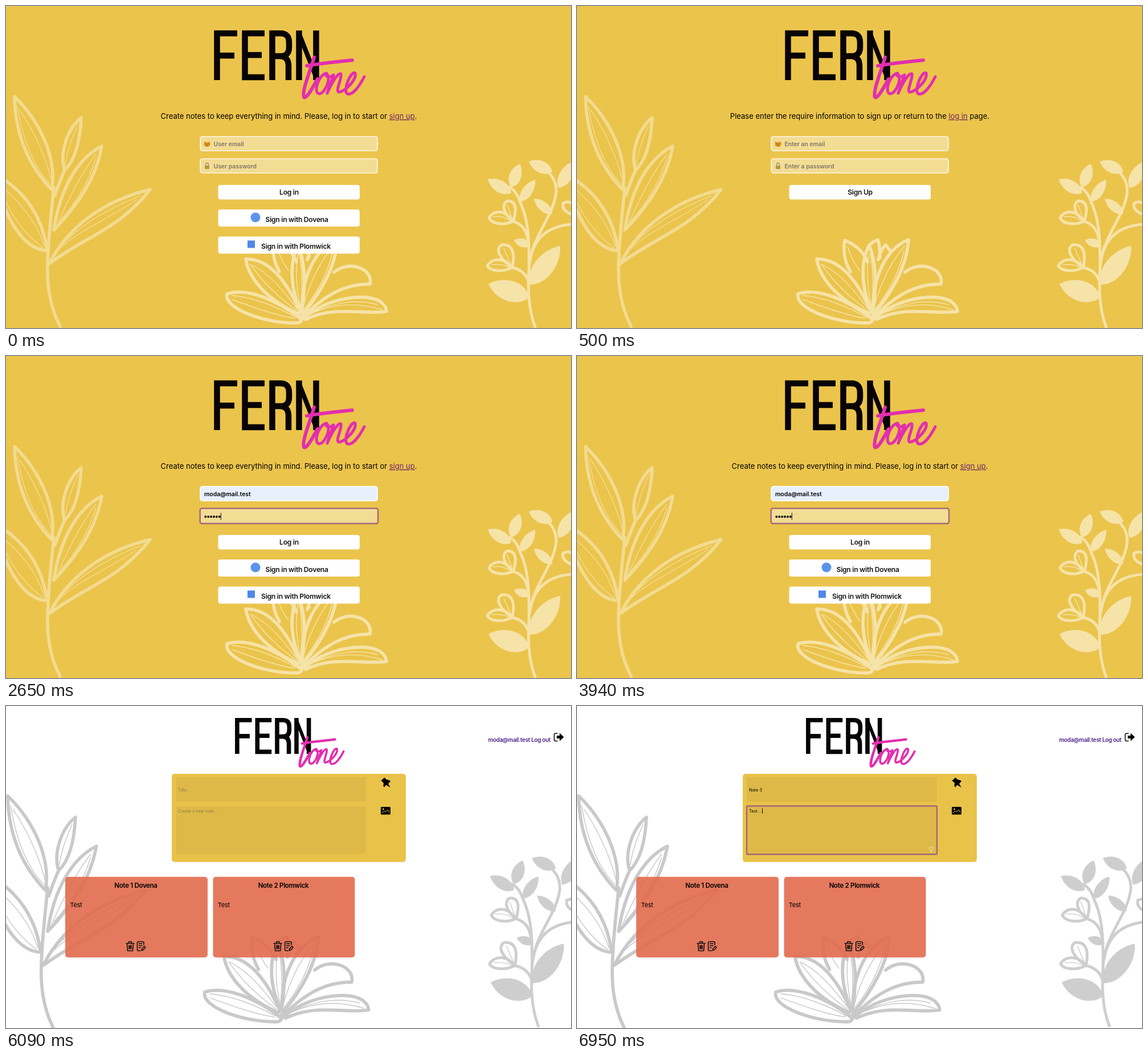
An HTML page that plays this animation: 992 by 565 pixels, repeating every 8 s.

```html
<!DOCTYPE html>
<html lang="en">
<head>
<meta charset="utf-8">
<title>Notes app</title>
<style>
html, body { margin: 0; width: 100%; height: 100%; overflow: hidden; background: #ebc44c; }
svg { display: block; width: 100%; height: 100%; }
text { font-family: Inter, "Open Sans", sans-serif; }
[data-on] { display: none; }
.line { fill: none; stroke: currentColor; stroke-width: 5.6; stroke-linecap: round; stroke-linejoin: round; }
.thin { stroke-width: 4.8; }
.vein { fill: none; stroke: currentColor; stroke-width: 1.4; stroke-linecap: round; }
.intro { font-size: 13px; text-anchor: middle; }
.link { fill: #6a2468; text-decoration: underline; }
.field { fill: #f3dc94; stroke: #fef8e6; stroke-width: 1.6; }
.hint { font-size: 10.4px; font-weight: 600; fill: #7d7768; }
.typed { font-size: 10.4px; font-weight: 600; }
.button { fill: #fff; }
.label { font-size: 12.2px; font-weight: 600; letter-spacing: -.3px; fill: #161616; }
.mid { text-anchor: middle; }
.small { font-size: 7.3px; }
.focus { stroke: #a4677a; stroke-width: 2.4; }
.card { fill: rgba(227, 107, 77, .9); }
.title { font-size: 11.5px; font-weight: 600; letter-spacing: -.3px; text-anchor: middle; }
.body { font-size: 11px; letter-spacing: -.2px; }
.icon { fill: none; stroke: #111; stroke-width: 1.6; stroke-linecap: round; stroke-linejoin: round; }
</style>
</head>
<body>
<svg viewBox="0 0 992 565" preserveAspectRatio="none">
<defs>
  <g id="logo">
    <g fill="none" stroke="#080404" stroke-width="10.5">
      <path d="M370.5 130V48H406M370.5 87H401"/>
      <path d="M454 48H419.5V125H454M419.5 86H449"/>
      <path d="M467.5 130V48H482Q497 48 497 64V72Q497 88 482 88H467.5M482 88Q496 89 496 105V130"/>
      <path d="M514.500 130V43M544.500 130V43"/>
      <path d="M514 47L545 126" stroke-width="8"/>
    </g>
    <g fill="none" stroke="#e32eae" stroke-width="6" stroke-linecap="round" stroke-linejoin="round">
      <path d="M541 90C534 114 519 150 523 160C528 164 540 140 547 128"/>
      <path d="M528 105C555 100 582 98 608 95"/>
      <path d="M563 118C548 120 539 153 550 154C562 153 573 120 561 119Q564 129 575 121L564 153C570 139 582 116 588 119C591 125 578 148 584 151C594 151 616 130 613 118C606 112 591 148 599 154C609 158 622 138 629 124" stroke-width="5"/>
    </g>
  </g>
  <g id="left">
    <g class="line">
      <path d="M95 562C78 530 72 492 73 455C74 405 80 362 84 318"/>
      <path d="M15 159C16 215 32 272 80 322C90 270 62 205 15 159Z"/>
      <path d="M132 196C108 215 93 258 103 288C122 270 130 235 132 196ZM103 288Q95 305 86 332"/>
      <path d="M168 246C126 267 95 320 84 393C112 364 158 310 168 246Z"/>
      <path d="M253 322C195 336 118 370 76 452C140 404 198 392 253 322Z"/>
      <path d="M-4 304C34 330 64 370 72 429C40 428 14 395 -4 350"/>
    </g>
    <path class="vein" d="M20 176C28 225 45 278 77 312M24 182C48 218 69 262 79 303M126 209Q109 246 104 278M158 260C130 296 107 345 91 380M158 266C144 312 118 352 95 376M236 333C181 354 119 389 83 437M229 340C182 373 119 397 86 434M0 324C35 354 56 386 67 421M0 344C16 379 43 409 65 424"/>
  </g>
  <g id="lotus">
    <g class="line">
      <path d="M519 550C476 515 422 494 388 505C382 532 458 558 513 556Q521 554 519 544"/>
      <path d="M514 540C464 519 427 482 421 444C461 443 492 480 517 538"/>
      <path d="M480 466C470 449 467 430 470 411C491 420 504 433 510 449"/>
      <path d="M516 532C497 488 499 445 513 420C526 452 526 493 519 535"/>
      <path d="M512 421Q519 414 528 410Q532 420 532 441M529 445Q533 427 542 419L550 430"/>
      <path d="M520 536C518 472 545 425 582 410C579 457 553 503 521 540"/>
      <path d="M576 467C604 444 645 462 639 488C594 487 558 509 522 545"/>
      <path d="M522 548C566 511 630 503 656 518Q668 526 668 536C626 542 576 525 526 550"/>
    </g>
    <path class="vein" d="M397 508C433 511 475 527 508 546M397 515C432 528 473 543 507 548M429 453C451 485 481 513 510 534M432 454C467 472 491 506 511 531M475 422Q483 447 496 464M513 435C507 464 511 503 517 526M515 435C521 465 520 500 518 526M575 421C548 453 530 494 522 528M574 429C566 466 547 502 524 531M660 533C619 520 574 521 529 543M652 524C609 512 569 523 530 542"/>
  </g>
  <g id="right">
    <g class="line thin">
      <path d="M929 563C918 535 916 499 918 466C919 406 960 375 966 327C967 306 956 292 942 285"/>
      <path d="M920 448C926 407 951 386 994 383M918 490C918 440 922 384 903 345C900 336 896 325 884 318"/>
      <path d="M848 372C854 359 876 355 889 378C875 385 854 383 848 372ZM891 377C874 366 869 348 880 342C899 342 895 362 891 377ZM890 378Q911 383 916 408"/>
      <path d="M845 456C853 442 875 440 888 459C874 467 851 466 845 456ZM889 458C868 446 857 425 871 419C892 417 893 438 889 458ZM888 459Q909 462 917 482"/>
      <path d="M994 366Q975 359 978 346Q988 341 994 347"/>
    </g>
    <path class="vein" d="M855 370Q873 367 885 377M880 349L889 374M853 454Q872 452 884 459M874 425L887 455"/>
    <path id="leaves" fill="currentColor"/>
  </g>
  <g id="hints">
    <path d="M348 237.500L351 239Q353 238.500 355 239L358 237.500L358.500 242Q359 247 353 247T347.500 242Z" fill="#e39a1c"/>
    <path d="M349.500 242H352M354 242H356.500M351.500 244.500H354.500" stroke="#6d3e12" stroke-width="1.200"/>
    <path d="M350.5 281V278Q350.5 275.5 353 275.5T355.5 278V281" fill="none" stroke="#969178" stroke-width="1.3"/>
    <rect x="349" y="280" width="8" height="6" rx="1" fill="#b39743"/>
  </g>
  <g id="tools" class="icon">
    <path d="M211 416.5H225M215.5 416V413.5H220.5V416M212.5 417L213.5 429.5H222.5L223.5 417M216 420V426M218 420V426M220 420V426"/>
    <path d="M236 429.5H232.5Q230.5 429.5 230.5 427.5V415.5Q230.5 413.5 232.5 413.5H240Q242 413.5 242 415.5V419M233.5 417H239M233.5 420.5H239M233.5 424H236M238 429L239 425.5L243 421.5L245 423.5L241 428Z"/>
  </g>
</defs>

<g data-on="0 1 2">
  <rect width="992" height="565" fill="#ebc44c"/>
  <use href="#left" color="#f3db90"/>
  <g color="#f6e3a8"><use href="#lotus"/><use href="#right"/></g>
  <use href="#logo"/>
  <text class="intro" x="496.5" y="198" data-on="0 2">Create notes to keep everything in mind. Please, log in to start or <tspan class="link">sign up</tspan>.</text>
  <text class="intro" x="496.5" y="198" data-on="1">Please enter the require information to sign up or return to the <tspan class="link">log in</tspan> page.</text>
  <g class="field">
    <rect x="341.2" y="229" width="311" height="25" rx="4"/>
    <rect x="341.2" y="268" width="311" height="25" rx="4"/>
  </g>
  <use href="#hints" data-on="0 1"/>
  <g class="hint" data-on="0"><text x="364.5" y="245.5">User email</text><text x="364.5" y="284.7">User password</text></g>
  <g class="hint" data-on="1"><text x="364.5" y="245.5">Enter an email</text><text x="364.5" y="284.7">Enter a password</text></g>
  <g data-on="2">
    <rect x="341.2" y="229" width="311" height="25" rx="4" fill="#e8f0fe" stroke="#fff" stroke-width="1.4"/>
    <text class="typed" x="348" y="245.5">moda@mail.test</text>
    <rect class="focus" x="340.7" y="267.4" width="312.4" height="26.6" rx="3" fill="#f3dc94"/>
    <path d="M350.3 282H375" stroke="#111" stroke-width="4" stroke-linecap="round" stroke-dasharray="0 4.9"/>
    <path d="M377.3 275V287.5" stroke="#111"/>
  </g>
  <rect class="button" x="372.5" y="314" width="248.5" height="25.5" rx="4"/>
  <text class="label mid" x="497" y="331" data-on="0 2">Log in</text>
  <text class="label mid" x="497" y="331" data-on="1">Sign Up</text>
  <g data-on="0 2">
    <rect class="button" x="372.5" y="357" width="248.5" height="30" rx="4"/>
    <circle cx="438" cy="371" r="8.5" fill="#5a94ea"/>
    <text class="label" x="455.5" y="378.5">Sign in with Dovena</text>
    <rect class="button" x="372.5" y="404.5" width="248.5" height="30" rx="4"/>
    <rect x="424" y="411.5" width="13" height="13" fill="#4f87e6"/>
    <text class="label" x="448" y="426">Sign in with Plomwick</text>
  </g>
</g>

<g data-on="3 4">
  <rect width="992" height="565" fill="#fff"/>
  <g color="#c9c9c9">
    <use href="#left" transform="translate(-12.3 -4.2) scale(1.017)"/>
    <use href="#lotus" transform="translate(-50 -13.2) scale(1.028 1.02)"/>
    <use href="#right" color="#cecece" transform="translate(-13 -10.2) scale(1.02 1.015)"/>
  </g>
  <use href="#logo" transform="translate(138 -10) scale(.723)"/>
  <text x="956" y="62.5" text-anchor="end" font-size="9.8" font-weight="600" letter-spacing="-.25" fill="#4b1f8a">moda@mail.test Log out</text>
  <path class="icon" d="M968 48H965Q962.5 48 962.5 50.5V59Q962.5 61.5 965 61.5H968"/>
  <path d="M967 52H972V47.5L979.5 54.5L972 61.5V57H967Z"/>
  <rect x="291" y="119" width="411" height="154.7" rx="5" fill="#e9c349"/>
  <rect x="298" y="125" width="334" height="43" fill="#dfb947"/>
  <rect x="298" y="176" width="334" height="84" fill="#dfb947"/>
  <path d="M658.5 131L664.5 125.5L668 129L673.5 130.5L675 132L671 136.5L675 143L667.5 138.5L664 142.5L662.5 140.5L663 135Z"/>
  <rect x="658" y="177" width="17" height="13.5" rx="1.5"/>
  <path d="M660 188L664 184L666.5 186L670 182L673.5 187" fill="none" stroke="#e9c349"/>
  <circle cx="662.5" cy="181" r="1.4" fill="#e9c349"/>
  <g class="small" fill="#8c7c4b" data-on="3"><text x="302" y="149.8">Title...</text><text x="302" y="186.8">Create a new note...</text></g>
  <g class="small" data-on="4">
    <rect class="focus" x="298" y="175.5" width="334" height="84.7" rx="1" fill="none"/>
    <text x="302" y="149.8">Note 3</text><text x="302" y="186.8">Test ...</text>
    <path d="M325.5 179.5V188.5" stroke="#111"/>
    <path d="M617.5 249Q622 245.5 626.5 249L622 253ZM622 253V256M620 256H624" fill="none" stroke="#eee0b0"/>
  </g>
  <rect class="card" x="104" y="299.7" width="250" height="141.5" rx="5"/>
  <rect class="card" x="363.5" y="299.7" width="249" height="141.5" rx="5"/>
  <text class="title" x="228" y="318.8">Note 1 Dovena</text>
  <text class="title" x="487" y="318.8">Note 2 Plomwick</text>
  <text class="body" x="112.5" y="352.5">Test</text>
  <text class="body" x="371.7" y="352.5">Test</text>
  <use href="#tools"/><use href="#tools" x="259.2"/>
</g>
</svg>
<script>
// A leaf runs from its tip to its stalk, bulging by w on each side.
function leaf([x1, y1, x2, y2, w]) {
  const len = Math.hypot(x2 - x1, y2 - y1);
  const nx = (y1 - y2) / len * w, ny = (x2 - x1) / len * w;
  const at = (k, s) => `${x1 + (x2 - x1) * k + nx * s} ${y1 + (y2 - y1) * k + ny * s}`;
  return `M${x1} ${y1}C${at(.3, 1)} ${at(.8, 1)} ${x2} ${y2}C${at(.8, -1)} ${at(.3, -1)} ${x1} ${y1}Z`;
}
document.getElementById("leaves").setAttribute("d", [
  [846, 304, 887, 328, 14], [902, 277, 887, 318, 14], [929, 305, 903, 343, 12],
  [918, 273, 959, 291, 14], [998, 272, 970, 319, 15], [927, 338, 959, 365, 11],
  [892, 411, 921, 420, 10], [973, 421, 920, 489, 23], [847, 488, 919, 511, 24]
].map(leaf).join(""));

const cuts = [500, 2650, 4800, 6950];
const parts = [...document.querySelectorAll("[data-on]")];
let shown = -1;
function draw(now) {
  const scene = cuts.filter(c => now % 8000 >= c).length;
  if (scene !== shown) {
    shown = scene;
    for (const p of parts) p.style.display = p.dataset.on.includes(scene) ? "inline" : "none";
  }
  requestAnimationFrame(draw);
}
draw(performance.now());
</script>
</body>
</html>
```
